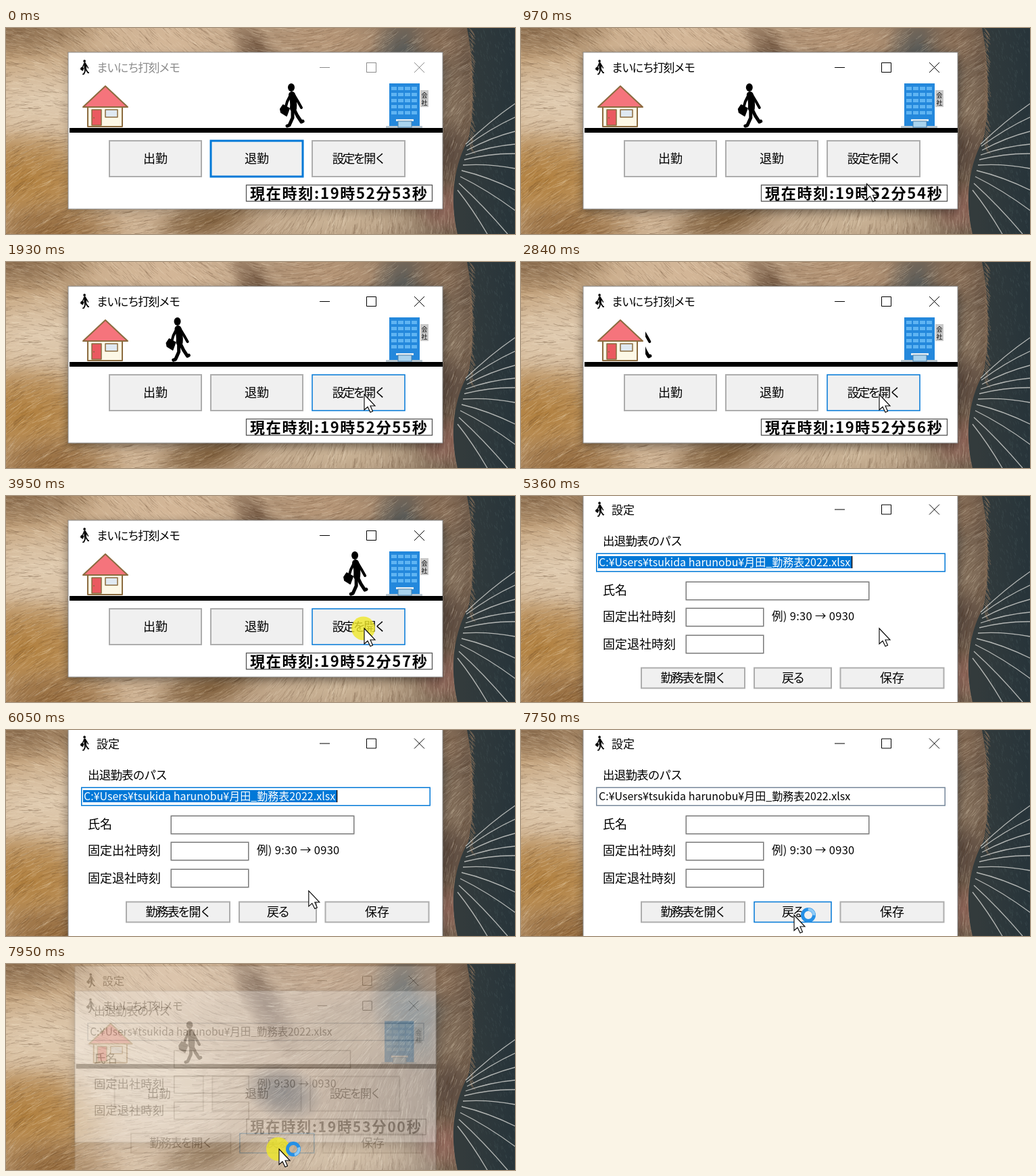
Recreate the animation shown at these times as an HTML page with a canvas. Size 753 by 305 pixels, loop 8000 ms.

```html
<!DOCTYPE html>
<html lang="ja">
<head>
<meta charset="utf-8">
<style>
html, body { margin: 0; width: 100%; height: 100%; overflow: hidden; background: #2c383c; }
canvas, svg { position: absolute; left: 0; top: 0; }
text { font-family: 'Noto Sans CJK JP', 'Noto Sans CJK', sans-serif; white-space: pre; }
</style>
</head>
<body>
<canvas id="fur" width="753" height="305"></canvas>
<svg id="ui" width="753" height="305" viewBox="0 0 753 305"></svg>
<script>
const LOOP = 8000, STEP = 69.15;
const BLUE = '#0078d7', GREY = '#adadad';
const $ = id => document.getElementById(id);
const clamp = v => Math.max(0, Math.min(1, v));

// ---------- wallpaper ----------
function paintFur() {
  const c = $('fur').getContext('2d');
  let seed = 7;
  const rnd = () => (seed = (seed * 16807) % 2147483647) / 2147483647;
  const blob = (x, y, rx, ry, color, turn = 0) => {
    c.save();
    c.translate(x, y);
    c.rotate(turn);
    c.scale(rx, ry);
    const g = c.createRadialGradient(0, 0, 0, 0, 0, 1);
    g.addColorStop(0, color);
    g.addColorStop(.45, color + 'b0');
    g.addColorStop(1, color + '00');
    c.fillStyle = g;
    c.fillRect(-1, -1, 2, 2);
    c.restore();
  };
  const hair = (x, y, a, len, color) => {
    c.strokeStyle = color;
    c.beginPath();
    c.moveTo(x, y);
    c.quadraticCurveTo(x + len * .5 * Math.cos(a), y + len * .5 * Math.sin(a),
      x + len * Math.cos(a + .25), y + len * Math.sin(a + .25));
    c.stroke();
  };

  const base = c.createLinearGradient(0, 0, 753, 0);
  base.addColorStop(0, '#c3a27b');
  base.addColorStop(.3, '#cdb294');
  base.addColorStop(.6, '#a98c70');
  base.addColorStop(.9, '#6b5848');
  c.fillStyle = base;
  c.fillRect(0, 0, 753, 305);
  blob(20, 0, 130, 50, '#8f7152');
  blob(60, 110, 190, 70, '#e0cbb0');
  blob(30, 225, 150, 75, '#b1803f');
  blob(70, 300, 110, 50, '#946a3c');
  blob(240, 20, 130, 60, '#d3b697');
  blob(220, 180, 150, 90, '#dac4a8');
  blob(385, 60, 100, 32, '#6f543f', 1);
  blob(480, 20, 100, 50, '#b79778');
  blob(500, 110, 110, 60, '#a1876b');
  blob(410, 190, 62, 42, '#46403d', .3);
  blob(300, 285, 100, 34, '#82623f', -.2);
  blob(490, 285, 170, 50, '#cbb497');
  blob(600, 70, 62, 95, '#4d575a', -.25);
  blob(640, 20, 50, 50, '#8a7059');
  blob(660, 110, 36, 70, '#85715d');
  blob(655, 185, 34, 50, '#5e4d42');
  blob(650, 265, 50, 40, '#92695c');

  c.lineWidth = 1;
  for (let i = 0; i < 7000; i++) {
    const x = rnd() * 700 - 5, y = rnd() * 310;
    const a = 2.5 + .7 * Math.sin(x / 130) + .5 * Math.cos(y / 90);
    hair(x, y, a, 7 + rnd() * 14,
      rnd() < .55 ? 'rgba(255,240,215,.16)' : 'rgba(60,35,15,.15)');
  }

  // dark backdrop to the right of the cheek
  const dark = c.createLinearGradient(675, 0, 753, 0);
  dark.addColorStop(0, '#333b3c');
  dark.addColorStop(1, '#27343a');
  c.fillStyle = dark;
  c.beginPath();
  c.moveTo(682, 0);
  c.bezierCurveTo(694, 60, 692, 130, 684, 165);
  c.bezierCurveTo(664, 200, 655, 250, 668, 305);
  c.lineTo(753, 305);
  c.lineTo(753, 0);
  c.fill();
  for (let y = 0; y < 180; y += 1.5)
    hair(684 + rnd() * 5, y, .7, 5 + rnd() * 6, 'rgba(140,116,92,.6)');
  for (let i = 0; i < 400; i++)
    hair(692 + rnd() * 60, rnd() * 305, 1, 5, 'rgba(110,130,135,.13)');

  // whiskers
  c.lineWidth = 1.3;
  for (const [x, y, ex, ey] of [[680, 172, 753, 112], [681, 175, 753, 132], [682, 181, 753, 153],
    [680, 188, 753, 172], [678, 195, 753, 186], [676, 203, 753, 208], [674, 211, 753, 240],
    [672, 220, 753, 270], [670, 230, 742, 305], [668, 240, 712, 305]]) {
    c.strokeStyle = 'rgba(225,225,220,.75)';
    c.beginPath();
    c.moveTo(x, y);
    c.quadraticCurveTo((x + ex) / 2, (y + ey) / 2 - 5, ex, ey);
    c.stroke();
  }
}

// ---------- markup helpers ----------
const rect = (x, y, w, h, fill, more = '') =>
  `<rect x="${x}" y="${y}" width="${w}" height="${h}" fill="${fill}" ${more}/>`;
const text = (x, y, s, size = 17, gap = 0, more = '') =>
  `<text x="${x}" y="${y}" font-size="${size}" letter-spacing="${gap}" ${more}>${s}</text>`;
const field = (x, y, w, h, id = '') =>
  rect(x + .75, y + .75, w - 1.5, h - 1.5, '#fff', `stroke="#7a7a7a" stroke-width="1.5" id="${id}"`);
const button = (id, x, y, w, h, label, gap = 0) =>
  rect(x + 1, y + 1, w - 2, h - 2, '#f0f0f0', `stroke="${GREY}" stroke-width="2" id="${id}"`) +
  text(x + w / 2, y + h / 2 + 6, label, 18, gap, 'text-anchor="middle"');
const man = (legA = '', legB = '') => `
  <g stroke="#000" stroke-linecap="round" stroke-linejoin="round" fill="none">
    <ellipse cx="17" cy="6" rx="5" ry="6" fill="#000" stroke="none"/>
    <path d="M18 17Q21 26 20 37" stroke-width="10"/>
    <path d="M21 17L27 27L32 36M16 17L11 27L9 34" stroke-width="4"/>
    <path d="M1 38L5 32L14 37L10 48L2 43Z" fill="#000" stroke-width="2"/>
    <path ${legA} d="M19 38L19 51L14 62L11 63" stroke-width="5"/>
    <path ${legB} d="M21 38L26 48L32 57L34 56" stroke-width="5"/>
  </g>`;
const frame = (top, h, title, gap, id) => `
  ${rect(92, top + 4, 554, h, '#000', `opacity=".4" filter="url(#blur)" id="${id}Shade"`)}
  ${rect(92, top, 554, h, '#fff', 'stroke="#8c8c8c"')}
  <g transform="translate(110 ${top + 11}) scale(.36 .34)">${man()}</g>
  <g id="${id}Bar" stroke="#000" fill="none">
    ${text(134, top + 29, title, 17, gap, 'fill="#000" stroke="none"')}
    <path d="M464 ${top + 22.5}h15M533.5 ${top + 15.5}h14v14h-14zM604 ${top + 15}l15 15m0 -15l-15 15"/>
  </g>`;

const house = `
  ${rect(100, 82, 84, 66, '#fff')}
  <g stroke="#8b6b3f" stroke-width="2" stroke-linejoin="round">
    <path d="M121 112V146H172V112Z" fill="#fdf8e6"/>
    <path d="M147 86L180 117H114Z" fill="#f5747c"/>
    ${rect(127, 121, 14, 23, '#ea5a60', 'stroke-width="1.5"')}
    ${rect(147, 121, 18, 11, '#dfe9f2', 'stroke-width="1.5"')}
  </g><circle cx="130" cy="133" r="1" fill="#8b6b3f"/>`;
let panes = '';
for (let y = 87; y < 130; y += 9)
  for (let x = 570; x < 608; x += 10) panes += rect(x, y, 8, 5, '#5fb4f2');
const office = `
  ${rect(556, 82, 86, 66, '#fff')}
  ${rect(567, 82, 45, 64, '#2488dc')}${panes}
  ${rect(562, 145, 54, 3, '#b9c6cf')}
  ${rect(577, 135, 26, 3, '#e8eef2')}
  ${rect(580, 138, 20, 9, '#a9d3ee', 'stroke="#4a7fa8"')}
  ${rect(613, 92, 12, 25, '#c9c9c9')}
  ${text(614.5, 103, '会', 9)}${text(614.5, 114, '社', 9)}`;

$('ui').innerHTML = `
  <defs><filter id="blur" x="-10%" y="-15%" width="120%" height="130%">
    <feGaussianBlur stdDeviation="7"/></filter></defs>
  <g id="main">
    ${frame(36, 232, 'まいにち打刻メモ', -1.7, 'main')}
    <g id="man"></g>${house}${office}
    ${rect(94, 148, 552, 7, '#000')}
    ${button('inBtn', 152, 166, 138, 55, '出勤')}
    ${button('outBtn', 302, 166, 138, 55, '退勤')}
    ${button('setBtn', 452, 166, 139, 55, '設定を開く', -2.5)}
    ${rect(355.5, 232.5, 275, 24, '#fff', 'stroke="#555" stroke-width="1.3"')}
    ${text(361, 253, '', 22, 1.75, 'font-weight="bold" id="clock"')}
  </g>
  <g id="settings">
    ${frame(-2.5, 330, '設定', 0, 'set')}
    ${text(121, 73, '出退勤表のパス', 17.5, -.8)}
    ${field(111, 84.5, 517, 28, 'pathBox')}
    ${rect(114, 89, 375, 18, BLUE, 'id="mark"')}
    ${text(115, 104, 'C:¥Users¥tsukida harunobu¥月田_勤務表2022.xlsx', 16, 0, 'id="path"')}
    ${rect(489, 89, 1.3, 18, '#000', 'id="caret"')}
    ${text(121, 146, '氏名', 18)}${field(243.5, 126.5, 272, 28)}
    ${text(121, 185, '固定出社時刻', 18)}${field(243.5, 165.5, 116, 28)}
    ${text(371, 184, '例) 9:30 → 0930', 16.5, .3)}
    ${text(121, 226, '固定退社時刻', 18)}${field(243.5, 205.5, 116, 28)}
    ${button('openBtn', 177, 253.5, 155, 32, '勤務表を開く', -2)}
    ${button('backBtn', 344, 253.5, 116, 32, '戻る', -2)}
    ${button('saveBtn', 471.5, 253.5, 155, 32, '保存')}
  </g>
  <g id="pointer">
    <circle id="press" cx="-1.5" r="17.5" fill="#efe828" opacity=".8"/>
    <g id="busy" transform="translate(21 0)" fill="none" stroke-width="5">
      <circle r="8.5" stroke="#2590e6"/>
      <circle id="arc" r="8.5" stroke="#8fcbf7" stroke-width="4" stroke-dasharray="14 40"/>
    </g>
    <path d="M0 0V23L5 18.5L9 26.5L12.5 25L9 17H16Z" fill="#fff" stroke="#000" stroke-width="1.1"/>
  </g>`;

// ---------- motion ----------
const track = [[560, 470, 308], [1150, 530, 196], [5500, 530, 196], [6040, 444, 240],
  [6230, 322, 260], [6320, 328, 264], [6460, 404, 274]];
function pointerAt(t) {
  let i = 0;
  while (i < track.length - 2 && t > track[i + 1][0]) i++;
  const [a, b] = [track[i], track[i + 1]];
  const p = clamp((t - a[0]) / (b[0] - a[0]));
  return [a[1] + (b[1] - a[1]) * p, a[2] + (b[2] - a[2]) * p];
}
const set = (id, o) => { for (const k in o) $(id).setAttribute(k, o[k]); };
const show = (id, on) => set(id, { visibility: on ? 'visible' : 'hidden' });
const pose = (id, alpha, scale) => set(id, {
  opacity: alpha,
  display: alpha > 0 ? 'inline' : 'none',
  transform: `translate(369 152) scale(${scale}) translate(-369 -152)`
});

function draw(ms) {
  const t = Math.floor((ms + 8) / STEP) * STEP;
  const active = t > 960, reopened = t > 7800;

  // windows
  const open = clamp((t - 4130) / 300), close = clamp((t - 7780) / 215);
  const grow = 1 - (1 - open) ** 2;
  pose('settings', reopened ? 1 - close : Math.min(1, open * 1.22),
    reopened ? 1 - .045 * close : .93 + .07 * grow);
  pose('main', reopened ? clamp((t - 7860) / 330) : open < 1 ? 1 : 0,
    reopened ? .965 : 1);
  set('mainBar', { opacity: active ? 1 : .45 });
  set('mainShade', { opacity: active ? .45 : .2 });

  // walker
  const left = reopened ? 251 : t < 3100 ? 405 - .087 * t : 842 - .087 * Math.min(t, 4085);
  const swing = (1 - Math.cos(t / 1000 * 2 * Math.PI)) / 2;
  const turn = deg => `transform="rotate(${deg * swing} 20 38)"`;
  $('man').innerHTML = man(turn(-13), turn(18));
  set('man', { transform: `translate(${left} 82)` });

  // clock
  const sec = reopened ? 60 : Math.min(57, 53 + Math.floor((t + 260) / 1000));
  $('clock').textContent =
    `現在時刻:19時${52 + Math.floor(sec / 60)}分${String(sec % 60).padStart(2, '0')}秒`;

  // pointer and buttons
  const [x, y] = pointerAt(t);
  set('pointer', { transform: `translate(${x} ${y})` });
  show('pointer', t > 560);
  show('press', t > 3900 && t < 4100 || t > 6730 && t < 6930 || t > 7850);
  show('busy', t > 7740);
  set('arc', { transform: `rotate(${t * .36 % 360})` });
  const hover = (id, x0, x1, y0, y1, on) => {
    const hit = on && x > x0 && x < x1 && y > y0 && y < y1;
    set(id, { stroke: hit ? BLUE : GREY, 'stroke-width': hit ? 1.5 : 2 });
  };
  const inMain = t < 4430, inSet = t > 4430;
  hover('setBtn', 452, 591, 166, 221, inMain);
  hover('openBtn', 177, 332, 254, 285, inSet);
  hover('backBtn', 344, 460, 254, 285, inSet);
  set('outBtn', { stroke: active ? GREY : BLUE, 'stroke-width': active ? 2 : 3 });

  // path field
  const focus = t < 6730;
  set('pathBox', { stroke: focus ? BLUE : '#76879a' });
  set('path', { fill: focus ? '#fff' : '#000' });
  set('mark', { opacity: focus ? 1 : 0 });
  set('caret', { opacity: focus && (t > 4820 && t < 5350 || t > 5880 && t < 6410) ? 1 : 0 });
}

paintFur();
const start = performance.now();
(function tick() {
  draw((performance.now() - start) % LOOP);
  requestAnimationFrame(tick);
})();
</script>
</body>
</html>
```
